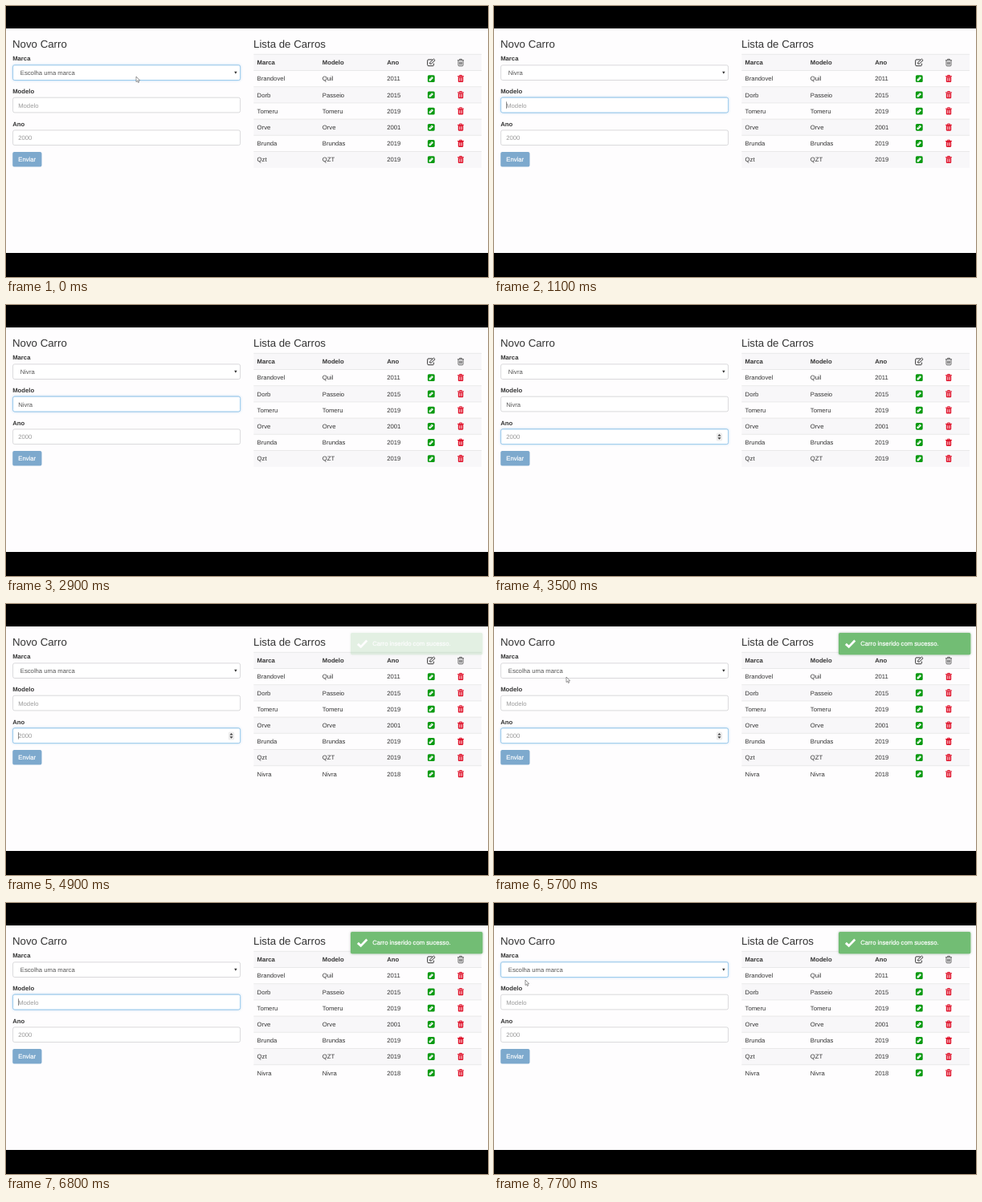
An HTML page that plays this animation: 600 px wide and 338 px high, repeating every 8 s.

```html
<!DOCTYPE html>
<html lang="pt-BR">
<head>
<meta charset="utf-8">
<title>Lista de Carros</title>
<style>
  html, body { margin: 0; width: 100%; height: 100%; overflow: hidden; background: #000; }
  svg { display: block; width: 100vw; height: 100vh; }
  text { font: 7.7px "Liberation Sans", Arial, sans-serif; fill: #333; text-rendering: geometricPrecision; white-space: pre; }
  .title { font-size: 13.27px; }
  .bold { font-weight: bold; }
  .value { fill: #555; }
  .hint { fill: #999; }
  .light { fill: #fff; stroke: #fff; stroke-width: .2; }
  .box { fill: #fff; stroke: #d0d0d2; stroke-width: .8; }
  .glow { fill: #fff; stroke: #8cc4ec; stroke-width: .8; filter: drop-shadow(0 0 1.8px rgba(102, 175, 233, .5)); }
  .toast { fill: #72bd74; filter: drop-shadow(0 0 1.5px rgba(110, 150, 110, .6)); }
</style>
</head>
<body>
<svg id="stage" viewBox="0 0 600 338">
  <defs>
    <g id="edit">
      <rect x="-4.4" y="-4.4" width="8.8" height="8.8" rx="1.6" fill="#0b9a12"/>
      <path d="M-2.7 2.7V.9L.9-2.7 2.7-.9-.9 2.7Z" fill="#fff"/>
      <path d="M-1.6 1 1-1.6" stroke="#0b9a12" stroke-width=".5"/>
    </g>
    <g id="trash">
      <path d="M-4-3H4M-1.4-3.2V-4.3H1.4V-3.2" fill="none" stroke="#e0142c" stroke-width="1"/>
      <path d="M-3.2-2.5H3.2V3.3Q3.2 4.4 2.2 4.4H-2.2Q-3.2 4.4-3.2 3.3Z" fill="#e0142c"/>
      <path d="M-1.5-1.2V3M0-1.2V3M1.5-1.2V3" stroke="#fff" stroke-width=".6"/>
    </g>
    <g id="editOutline" fill="none" stroke="#333" stroke-width="1">
      <path d="M1.5-3.6H-3.4Q-4.6-3.6-4.6-2.4V3Q-4.6 4.2-3.4 4.2H2Q3.2 4.2 3.2 3V1.2"/>
      <path d="M-1.6 1.6V0L3.2-4.4 4.8-2.8 0 1.6Z"/>
    </g>
    <g id="trashOutline" fill="none" stroke="#444" stroke-width=".8">
      <path d="M-4-2.8H4M-1.4-3V-4.2H1.4V-3M-3-2.6V3.2Q-3 4.3-2 4.3H2Q3 4.3 3 3.2V-2.6M-1.2-1V2.8M0-1V2.8M1.2-1V2.8"/>
    </g>
  </defs>
</svg>
<script>
const stage = document.getElementById('stage');
const LOOP = 8000, TICK = 100, ROW = 20.2, TABLE_TOP = 60.3;

function add(tag, attrs, parent = stage) {
  const node = document.createElementNS('http://www.w3.org/2000/svg', tag);
  for (const key in attrs) node.setAttribute(key, attrs[key]);
  return parent.appendChild(node);
}
function write(x, y, content, cls = '', parent = stage) {
  const node = add('text', { x, y, class: cls }, parent);
  node.textContent = content;
  return node;
}
const icon = (id, x, y, parent) => add('use', { href: '#' + id, x, y }, parent);
const show = (node, on) => node.setAttribute('opacity', +on);

add('rect', { y: 28, width: 600, height: 280, fill: '#fefdfe' });
write(8, 52.1, 'Novo Carro', 'title');
write(308, 52.1, 'Lista de Carros', 'title');

// Form
function makeField(label, y, hint, textX) {
  write(8.2, y - 5.4, label, 'bold');
  const shape = { x: 8.6, y, width: 283, height: 18.7, rx: 2.2 };
  add('rect', { ...shape, class: 'box' });
  const glow = add('rect', { ...shape, class: 'glow' });
  return { glow, hint, textX, y, text: write(textX, y + 12.4, '') };
}
const fields = {
  brand: makeField('Marca', 73.8, 'Escolha uma marca', 17.8),
  model: makeField('Modelo', 114.2, 'Modelo', 15.2),
  year: makeField('Ano', 154.9, '2000', 15.2)
};
add('path', { d: 'M284.2 81.8H287.6L285.9 84.8Z', fill: '#333' });
const spinner = add('g', {});
add('rect', { x: 276.8, y: 159.4, width: 7.4, height: 10, rx: 1.5, fill: '#eee' }, spinner);
add('path', { d: 'M278.4 163.4H282.6L280.5 160.9ZM278.4 165.3H282.6L280.5 167.8Z', fill: '#444' }, spinner);
const button = add('rect', { x: 8.2, y: 181.9, width: 36.3, height: 18.7, rx: 2.2 });
write(15.3, 194, 'Enviar', 'light');
const caret = add('rect', { width: .6, height: 8.6, fill: '#444' });

// Table
function makeRow(index, cells, cls) {
  const row = add('g', {}), top = TABLE_TOP + index * ROW, middle = top + ROW / 2;
  if (index % 2 === 0) add('rect', { x: 308.3, y: top, width: 283.7, height: ROW, fill: '#f8f7f9' }, row);
  add('path', { d: `M308.3 ${top}H592`, stroke: '#ddd', 'stroke-width': .6 }, row);
  [312.6, 393.8, 474.2].forEach((x, i) => write(x, middle + 2.8, cells[i], cls, row));
  icon(index ? 'edit' : 'editOutline', 529.3, middle + .1, row);
  icon(index ? 'trash' : 'trashOutline', 566, middle + .1, row);
  return row;
}
makeRow(0, ['Marca', 'Modelo', 'Ano'], 'bold');
const cars = [
  ['Brandovel', 'Quil', 2011], ['Dorb', 'Passeio', 2015], ['Tomeru', 'Tomeru', 2019],
  ['Orve', 'Orve', 2001], ['Brunda', 'Brundas', 2019], ['Qzt', 'QZT', 2019], ['Nivra', 'Nivra', 2018]
];
const newRow = cars.map((car, i) => makeRow(i + 1, car)).pop();

// Toast
const toast = add('g', {});
add('rect', { x: 429, y: 36, width: 164.3, height: 27.2, rx: 1.7, class: 'toast' }, toast);
add('path', { d: 'M437.9 49.9 441.7 53.4 449.3 45.6', fill: 'none', stroke: '#fff', 'stroke-width': 2.8 }, toast);
write(456.2, 52.1, 'Carro inserido com sucesso.', 'light', toast);

const pointer = add('path', {
  d: 'M0 0V6.6L1.5 5.2 2.5 7.6 3.6 7.1 2.6 4.8H4.6Z',
  fill: '#fff', stroke: '#555', 'stroke-width': .6
});

// Each step changes only the listed parts of the state.
const steps = [
  [0, { focus: 'brand', brand: '', model: '', year: '', caret: 0, saved: 0 }],
  [200, { brand: 'Nivra' }],
  [900, { focus: 'model', caret: 1 }],
  [1400, { caret: 0 }],
  [1500, { model: 'N', caret: 1 }],
  [1900, { model: 'Ni' }],
  [2200, { model: 'Niv' }],
  [2300, { model: 'Nivra' }],
  [2900, { caret: 0 }],
  [3100, { focus: 'year', caret: 1 }],
  [3500, { caret: 0 }],
  [3600, { year: '2', caret: 1 }],
  [3800, { year: '20' }],
  [4100, { year: '201' }],
  [4400, { year: '2018' }],
  [4900, { brand: '', model: '', year: '', saved: 1 }],
  [5400, { caret: 0 }],
  [5900, { caret: 1 }],
  [6100, { focus: 'model' }],
  [6500, { caret: 0 }],
  [6700, { caret: 1 }],
  [7000, { focus: 'brand', caret: 0 }]
];
// Pointer paths: time, x, y
const pointerPaths = [
  [[0, 162, 88], [200, 162, 88]],
  [[5400, 122, 72], [5700, 90, 91], [5800, 84, 99], [6000, 80, 108]],
  [[6900, 62, 103], [7200, 48, 88], [7400, 45, 88], [7700, 39, 96], [8000, 39, 96]]
];

function pointerAt(time) {
  for (const path of pointerPaths)
    for (let i = 1; i < path.length; i++) {
      const [t0, x0, y0] = path[i - 1], [t1, x1, y1] = path[i];
      if (time < t0 || time >= t1) continue;
      const k = (time - t0) / (t1 - t0);
      return [x0 + (x1 - x0) * k, y0 + (y1 - y0) * k];
    }
  return null;
}

function render(time) {
  const state = {};
  let focusTime = 0, previous = '';
  for (const [at, change] of steps) {
    if (at > time) break;
    if (change.focus) { previous = state.focus; focusTime = at; }
    Object.assign(state, change);
  }
  const fade = focusTime ? Math.min(1, (time - focusTime + 60) / 160) : 1;

  for (const name in fields) {
    const field = fields[name], value = state[name];
    field.text.textContent = value || field.hint;
    field.text.setAttribute('class', value || name === 'brand' ? 'value' : 'hint');
    show(field.glow, name === state.focus ? fade : name === previous ? 1 - fade : 0);
  }
  const active = fields[state.focus];
  const typed = state[state.focus] ? active.text.getComputedTextLength() : 0;
  caret.setAttribute('x', active.textX + typed + .2);
  caret.setAttribute('y', active.y + 5.1);
  show(caret, state.caret);
  show(spinner, state.focus === 'year');
  button.setAttribute('fill', state.brand && state.model && state.year ? '#337ab7' : '#7da9cd');
  show(newRow, state.saved);
  show(toast, state.saved ? Math.min(1, .19 + (time - 4900) / 370) : 0);

  const spot = pointerAt(time);
  show(pointer, spot !== null);
  if (spot) pointer.setAttribute('transform', `translate(${spot})`);
}

const start = performance.now();
function loop() {
  const time = (performance.now() - start) % LOOP;
  render(Math.floor(time / TICK) * TICK);
  requestAnimationFrame(loop);
}
loop();
</script>
</body>
</html>
```
